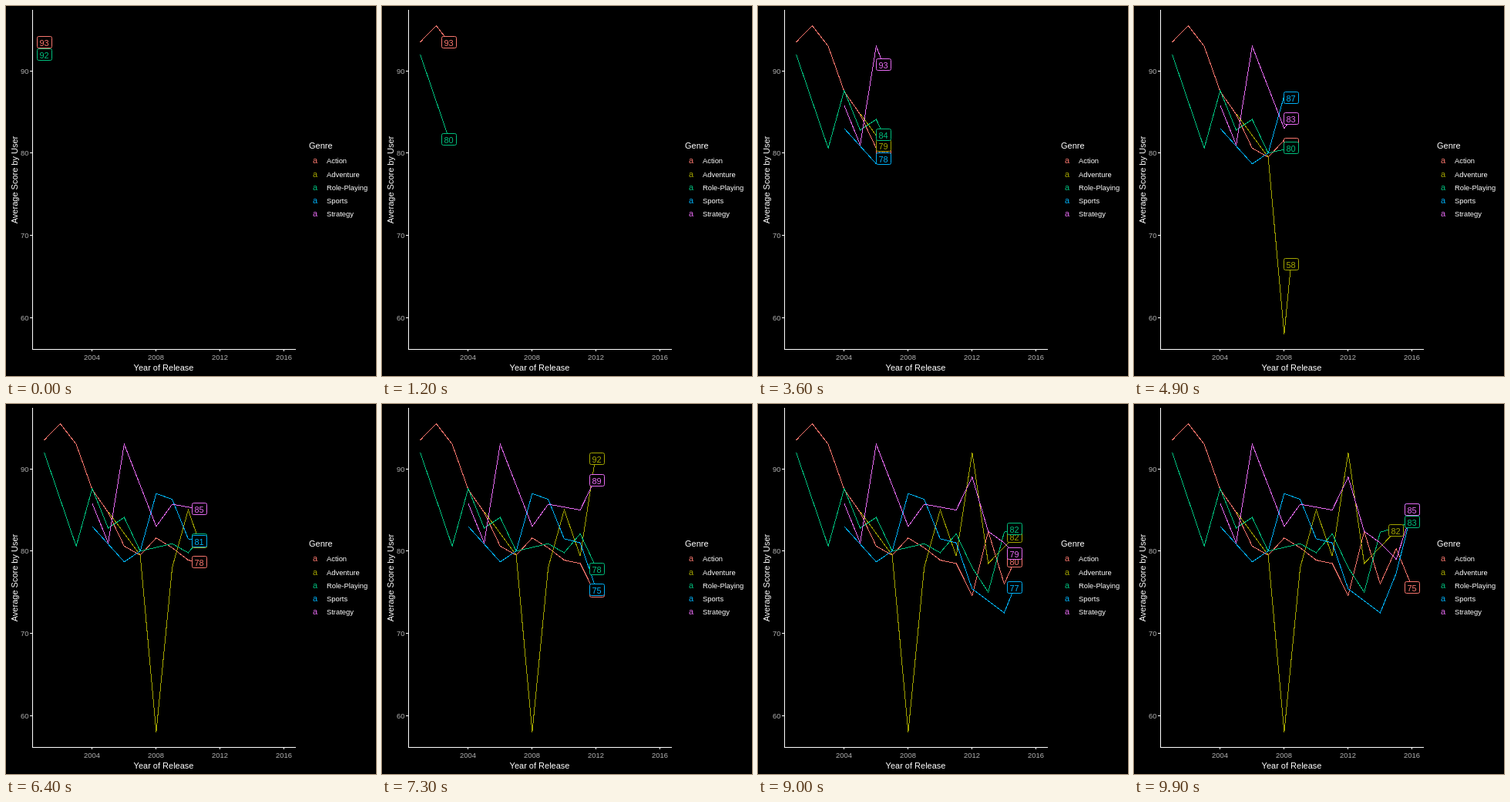
Write an HTML page that moves like this. It is 480 by 480 pixels and loops after 10 s.

```html
<!DOCTYPE html>
<html lang="en">
<head>
<meta charset="utf-8">
<title>Average score by genre</title>
<style>
  html, body { margin: 0; width: 100%; height: 100%; overflow: hidden; background: #000; }
  svg { display: block; width: 480px; height: 480px; background: #000; }
  text { font: 11px "Liberation Sans", Arial, sans-serif; fill: #fff; }
  .small { font-size: 9.4px; }
  .tick { fill: #b3b3b3; }
  .mid { text-anchor: middle; }
  .end { text-anchor: end; }
  path, polyline { fill: none; stroke: #fff; shape-rendering: crispEdges; }
  rect { fill: #000; }
</style>
</head>
<body>
<svg id="chart" viewBox="0 0 480 480"></svg>
<script>
const FRAMES = 100, STEP = 100, FIRST = 2001, LAST = 2016;
const gap = null;

// One score per year from the first year on; a gap is bridged by a straight line.
const genres = [
  { name: 'Action', color: '#F8766D', from: 2001,
    scores: [93.5, 95.5, 93, 87.5, 84.7, 80.6, 79.5, 81.6, 80.4, 78.9, 78.5, 74.6, 82.4, 76, 80.3, 75.6] },
  { name: 'Adventure', color: '#A3A500', from: 2005,
    scores: [84.8, gap, 79.5, 58, 78, 85, 79.4, 92, 78.5, gap, 82.5] },
  { name: 'Role-Playing', color: '#00BF7D', from: 2001,
    scores: [92, gap, 80.6, 87.6, 82.8, 84.1, 80, gap, 80.9, 79.8, 82.1, 78, 75, 82.3, gap, 83.5] },
  { name: 'Sports', color: '#00B0F6', from: 2004,
    scores: [83, gap, 78.7, 80, 87, 86.3, 81.5, 81, 75.4, gap, 72.5, 77.3, 85] },
  { name: 'Strategy', color: '#E76BF3', from: 2004,
    scores: [85.8, 81, 93, gap, 83, 85.7, gap, 85, 89, 82.4, 81, 79, 85] }
];
for (const g of genres) {
  g.points = g.scores.map((s, i) => [g.from + i, s]).filter(p => p[1] !== gap);
}

// Linear scale with a 5% margin at both ends of the data range.
function scale(lo, hi, start, end) {
  const pad = (hi - lo) * 0.05;
  return v => start + (v - lo + pad) / (hi - lo + 2 * pad) * (end - start);
}

const all = genres.flatMap(g => g.points.map(p => p[1]));
const xOf = scale(FIRST, LAST, 34, 376.5);
const yOf = scale(Math.min(...all), Math.max(...all), 445.5, 5.5);
const chart = document.getElementById('chart');

function add(parent, tag, attrs, text) {
  const el = document.createElementNS('http://www.w3.org/2000/svg', tag);
  for (const key in attrs) el.setAttribute(key, attrs[key]);
  if (text !== undefined) el.textContent = text;
  return parent.appendChild(el);
}

function drawAxes() {
  add(chart, 'path', { d: 'M34.5 5V445.5H376' });
  for (let score = 60; score <= 90; score += 10) {
    const y = Math.floor(yOf(score)) + 0.5;
    add(chart, 'path', { d: `M31 ${y}H34` });
    add(chart, 'text', { x: 29.5, y: y + 3.5, class: 'small tick end' }, score);
  }
  for (let year = 2004; year <= LAST; year += 4) {
    const x = Math.floor(xOf(year)) + 0.5;
    add(chart, 'path', { d: `M${x} 446V448` });
    add(chart, 'text', { x, y: 458.5, class: 'small tick mid' }, year);
  }
  add(chart, 'text', { x: 204.5, y: 473, class: 'mid' }, 'Year of Release');
  add(chart, 'text', { transform: 'translate(15 225.5) rotate(-90)', class: 'mid' }, 'Average Score by User');
}

function drawLegend() {
  add(chart, 'text', { x: 393, y: 185 }, 'Genre');
  genres.forEach((g, i) => {
    const y = Math.round(204.3 + i * 17.28);
    add(chart, 'text', { x: 401, y, class: 'mid', style: `fill:${g.color}` }, 'a');
    add(chart, 'text', { x: 416, y, class: 'small' }, g.name);
  });
}

function addMarks() {
  for (const g of genres) g.line = add(chart, 'polyline', { style: `stroke:${g.color}` });
  for (const g of genres) {
    g.label = add(chart, 'g', {});
    add(g.label, 'rect', { x: 0.5, y: 0.5, width: 19, height: 15, rx: 2, stroke: g.color });
    g.value = add(g.label, 'text', { x: 9.5, y: 13, class: 'mid', style: `fill:${g.color}` });
  }
}

// The shown score switches halfway between neighbouring points.
function tipAt(points, year) {
  const next = points.findIndex(p => p[0] > year);
  if (next < 0) {
    const [x, score] = points[points.length - 1];
    return { x, score, shown: score, count: points.length };
  }
  const [x0, a] = points[next - 1], [x1, b] = points[next];
  const k = (year - x0) / (x1 - x0);
  return { x: year, score: a + (b - a) * k, shown: k < 0.5 ? a : b, count: next };
}

function render(frame) {
  const year = FIRST + frame * (LAST - FIRST) / (FRAMES - 1);
  for (const g of genres) {
    const visible = year >= g.from;
    g.line.style.display = g.label.style.display = visible ? '' : 'none';
    if (!visible) continue;
    const tip = tipAt(g.points, year);
    const path = [...g.points.slice(0, tip.count), [tip.x, tip.score]];
    g.line.setAttribute('points', path.map(([x, s]) => `${xOf(x)},${yOf(s)}`).join(' '));
    const left = Math.round(xOf(tip.x)) - 10, top = Math.round(yOf(tip.score) - 8.2);
    g.label.setAttribute('transform', `translate(${left} ${top})`);
    g.value.textContent = Math.floor(tip.shown);
  }
}

drawAxes();
drawLegend();
addMarks();
render(0);

const start = performance.now();
function tick() {
  render(Math.floor((performance.now() - start) / STEP) % FRAMES);
  requestAnimationFrame(tick);
}
requestAnimationFrame(tick);
</script>
</body>
</html>
```
